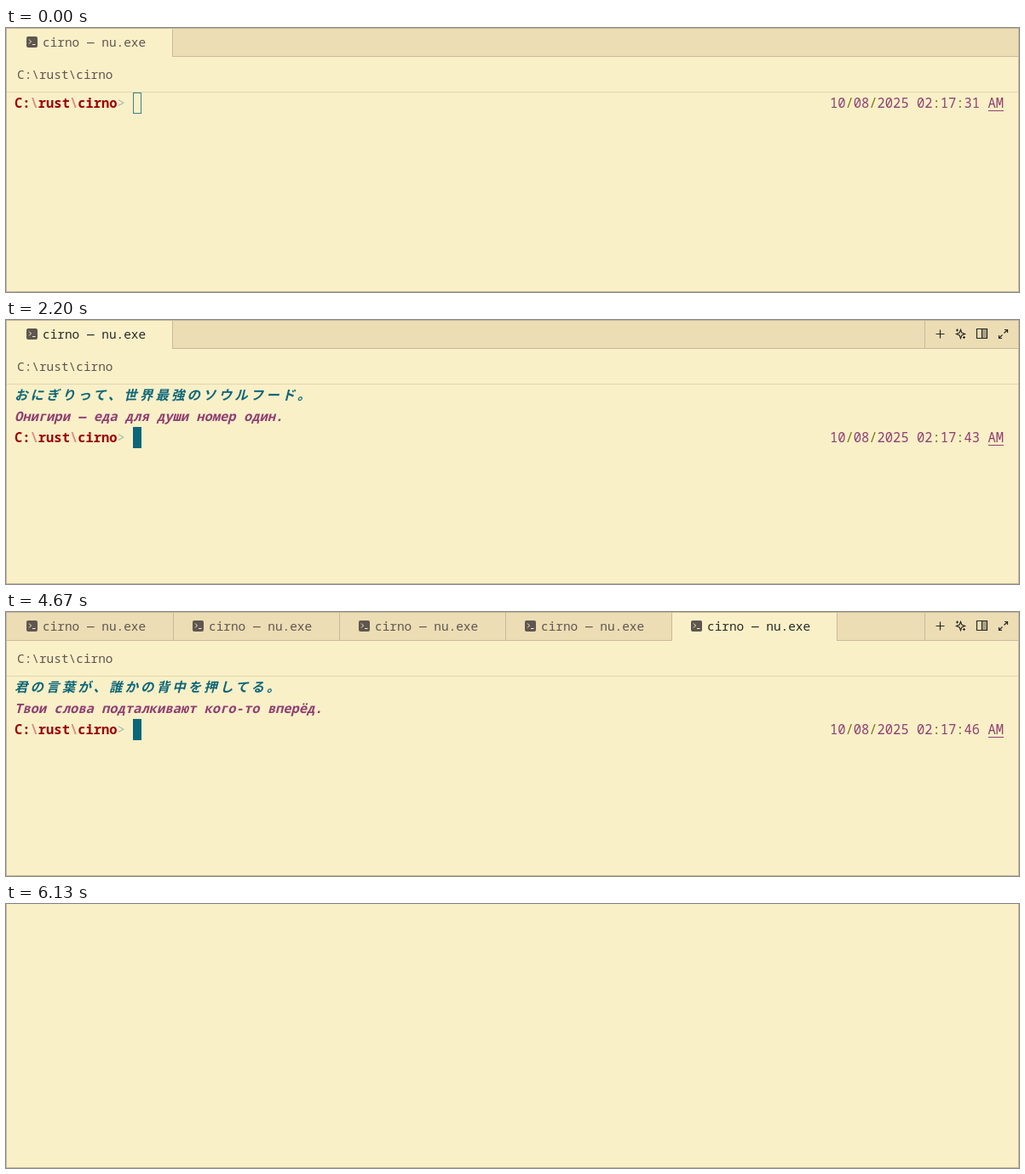
Write an HTML page that moves like this. It is 1189 px wide and 311 px high and loops after 7.94 s.

```html
<!DOCTYPE html>
<html lang="en">
<head>
<meta charset="utf-8">
<title>Terminal tabs</title>
<style>
  html, body { margin: 0; width: 100%; height: 100%; overflow: hidden; background: #faf0c8; }
  svg { display: block; width: 100vw; height: 100vh; }
  text { font-family: "Noto Sans Mono", "DejaVu Sans Mono", monospace; white-space: pre; }
  .ui { font-size: 14.43px; fill: #5f5650; }
  .term { font-size: 15.46px; }
  .quote { font-weight: 700; font-style: italic; }
  .ja { font-family: "Noto Sans CJK JP", "Noto Sans CJK", sans-serif; letter-spacing: 3.1px; fill: #0b6678; }
  .magenta { fill: #8f3f71; }
  .active { fill: #282828; }
  .icon { fill: none; stroke: #282828; stroke-width: 1.2; }
</style>
</head>
<body>
<svg viewBox="0 0 1189 311"><g id="view"></g><path id="beam" fill="none" stroke="#282828" d="M-3.5-7.5h2.5l1 1 1-1h2.5M0-6.5v13M-3.5 7.5h2.5l1-1 1 1h2.5"/></svg>
<script>
const LOOP = 7940, CELL = 9.276, LEFT = 10, ROW = 25, TOP = 76, TAB = 195;
const BG = '#faf0c8', BAR = '#ecddb4', BORDER = '#c9b99a', TEAL = '#0b6678';

const sessions = [
  ['おにぎりって、世界最強のソウルフード。', 'Онигири — еда для души номер один.', 43],
  ['今日も一歩、前へ進もう。', 'Сегодня тоже сделай шаг вперёд.', 44],
  ['誰かの優しさに気づける、それだけで幸せ。', 'Если можешь заметить чью-то доброту — ты уже счастлив.', 45],
  ['どんなに小さくても、夢は夢だよ。', 'Каким бы маленьким ни была мечта — это всё равно мечта.', 45],
  ['君の言葉が、誰かの背中を押してる。', 'Твои слова подталкивают кого-то вперёд.', 46]
];

// Start time, number of open tabs (the last is active), mode
const scenes = [
  [0, 1, 'idle'], [1200, 0], [2200, 1], [3200, 2, 'loading'], [3270, 2],
  [3730, 3, 'loading'], [3800, 3], [4270, 4], [4670, 5],
  [5530, 4], [6000, 3], [6070, 1], [6130, 0]
];

const rect = (x, y, w, h, fill, extra = '') =>
  `<rect x="${x}" y="${y}" width="${w}" height="${h}" fill="${fill}" ${extra}/>`;
const text = (x, y, cls, body) => `<text x="${x}" y="${y}" class="${cls}">${body}</text>`;
const tint = (body, color) => `<tspan fill="${color}">${body}</tspan>`;
const baseline = row => TOP + row * ROW + 18.3;

function tab(i, active, focused) {
  const x = i * TAB;
  const back = active
    ? rect(x + 1, 1, TAB, 33, BORDER) + rect(x + (i ? 2 : 1), 1, TAB - (i ? 2 : 1), 33, BG)
    : rect(x + TAB + 1, 1, 1, 33, BORDER);
  return back + rect(x + 24, 10, 13, 13, '#5f5650', 'rx="2"') +
    `<path d="M${x + 27} 13.5l2.5 2.5-2.5 2.5M${x + 31} 19.5h3.5" fill="none" stroke="${BG}"/>` +
    text(x + 43, 22, active && focused ? 'ui active' : 'ui', 'cirno — nu.exe');
}

function toolbarIcons() {
  return rect(1078, 1, 1, 32, BORDER) + rect(1145.5, 10.5, 6, 11, '#28282855') +
    `<path class="icon" d="M1091.5 16.5h10M1096.5 11.5v10
      M1120.5 11.5l1.4 3.6 3.6 1.4-3.6 1.4-1.4 3.6-1.4-3.6-3.6-1.4 3.6-1.4z
      M1116.5 10.5v3M1115 12h3M1124.5 19v3M1123 20.5h3
      M1139.5 10.5h12v11h-12zM1145.5 10.5v11
      M1171.5 15.5l4-4M1172 11.5h3.5v3.5M1169.5 17.5l-4 4M1165.5 18v3.5h3.5"/>`;
}

function prompt(row, seconds, focused) {
  const y = baseline(row), top = TOP + row * ROW, x = LEFT + 15 * CELL;
  const slash = tint('\\', '#db8b80');
  const date = `10/08/2025 02:17:${seconds} `.replace(/[/:]/g, mark => `\u0001${mark}`)
    .replace(/\u0001(.)/g, (_, mark) => tint(mark, '#797410'));
  return text(LEFT, y, 'term', `<tspan font-weight="700" fill="#9d0006">C:${slash}rust${slash}cirno</tspan>${tint('&gt;', '#9fbca8')}`) +
    text(1171 - 22 * CELL, y, 'term magenta', date + 'AM') +
    rect(1153, top + 21, 18, 1, '#8f3f71') +
    (focused ? rect(149, top, 10, ROW, TEAL)
             : rect(149.5, top + .5, 9, ROW - 1, 'none', `stroke="${TEAL}" stroke-opacity=".8"`));
}

function render([, count, mode]) {
  const frame = rect(0, 0, 1189, 311, BG) + rect(0, 0, 1, 311, BORDER) +
    rect(1188, 0, 1, 311, BORDER) + rect(0, 310, 1189, 1, BORDER);
  if (!count) return frame;

  const focused = mode !== 'idle', loading = mode === 'loading';
  const [japanese, russian, seconds] = sessions[count - 1];
  let out = frame + rect(1, 1, 1187, 32, BAR) + rect(0, 0, 1189, 1, BORDER) +
    rect(1, 33, 1187, 1, BORDER) + rect(1, 75, 1187, 1, '#e4d5ad');
  for (let i = 0; i < count; i++) out += tab(i, i === count - 1, focused);
  out += text(13, 60, 'ui', loading ? 'C:\\Users\\Groundskeeper\\scoop\\shims\\nu.exe' : 'C:\\rust\\cirno');
  if (!focused) return out + prompt(0, 31, false);

  out += toolbarIcons() + text(LEFT, baseline(0), 'term quote ja', japanese) +
    text(LEFT, baseline(1), 'term quote magenta', russian);
  return out + (loading
    ? rect(Math.round(LEFT + russian.length * CELL), TOP + ROW, 10, ROW, TEAL)
    : prompt(2, seconds, true));
}

function pointer(t) {
  if (t < 70 || t >= 1330) return null;
  if (t < 130) return [1157.5, 76];
  const step = t < 530 ? 0 : Math.min(1, (Math.floor((t - 530) / 67.3) + 1) / 10);
  const ease = step * step * (3 - 2 * step);
  return [1180.5 - 987 * ease, 288 - 273 * ease];
}

const view = document.getElementById('view'), beam = document.getElementById('beam');
let shown;
function draw(now) {
  const t = now % LOOP;
  const scene = scenes.findLast(([start]) => start <= t);
  if (scene !== shown) view.innerHTML = render(shown = scene);
  const spot = pointer(t);
  beam.setAttribute('visibility', spot ? 'visible' : 'hidden');
  if (spot) beam.setAttribute('transform', `translate(${spot})`);
}
const origin = performance.now();
function tick() {
  draw(performance.now() - origin);
  requestAnimationFrame(tick);
}
tick();
</script>
</body>
</html>
```
